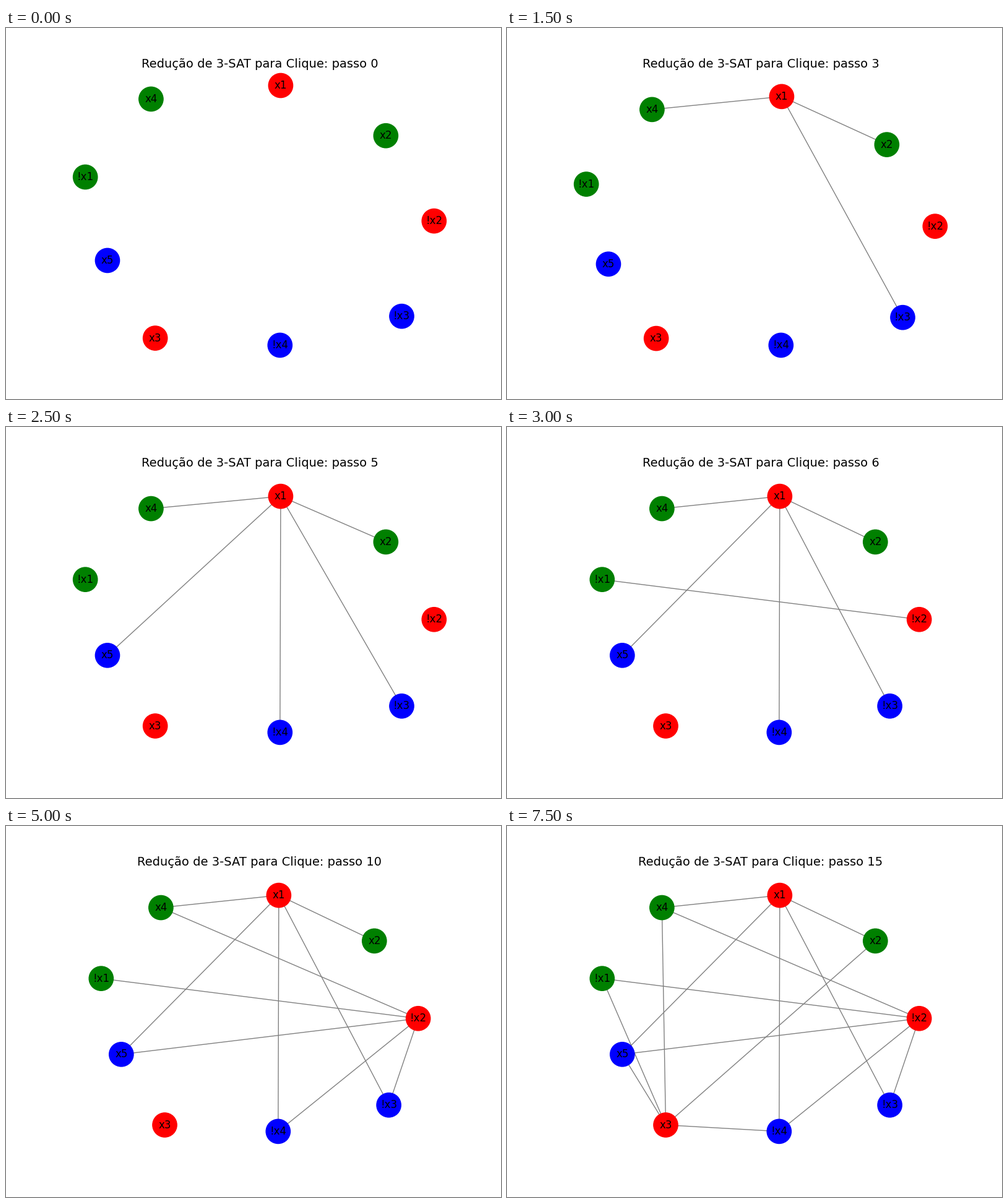
Recreate the animation shown at these times as a matplotlib script. Size 800x600 px, loop 8000 ms.

```python
import numpy as np
import matplotlib.pyplot as plt
from matplotlib.animation import FuncAnimation
from matplotlib.collections import LineCollection

STEP_MS = 500
PAD = 0.05

# One clause per colour; positions are scaled to the unit square.
CLAUSES = [
    ("red", {"x1": (0.5602, 1.0), "!x2": (1.0, 0.4783), "x3": (0.2005, 0.0272)}),
    ("green", {"!x1": (0.0, 0.6476), "x2": (0.8617, 0.8067), "x4": (0.1885, 0.9478)}),
    ("blue", {"!x3": (0.9072, 0.1115), "!x4": (0.5582, 0.0), "x5": (0.0635, 0.3263)}),
]


def opposed(a, b):
    return a == "!" + b or b == "!" + a


pos = {lit: np.array(p) for _, nodes in CLAUSES for lit, p in nodes.items()}
colors = [color for color, nodes in CLAUSES for _ in nodes]
points = np.array(list(pos.values()))

# Link each literal of the first clause to the compatible ones of the others.
edges = [
    (pos[a], pos[b])
    for a in CLAUSES[0][1]
    for _, nodes in CLAUSES[1:]
    for b in nodes
    if not opposed(a, b)
]

fig, ax = plt.subplots(figsize=(8, 6), dpi=100)
fig.subplots_adjust(left=0.125, right=0.9, bottom=0.11, top=0.88)
ax.axis("off")

lines = LineCollection([], colors="gray", linewidths=1, zorder=1)
ax.add_collection(lines, autolim=False)
ax.scatter(points[:, 0], points[:, 1], s=800, c=colors, zorder=2)
for lit, (x, y) in pos.items():
    ax.text(x, y, lit, size=12, ha="center", va="center", zorder=3)
title = ax.set_title("", fontsize=14)


def padded(pts):
    lo, hi = pts.min(axis=0), pts.max(axis=0)
    pad = PAD * (hi - lo)
    return np.array([lo - pad, hi + pad])


def update(step):
    shown = edges[:step]
    lines.set_segments(shown)
    area = points
    if shown:
        area = np.vstack([points, padded(np.vstack(shown))])
    (x0, y0), (x1, y1) = padded(area)
    ax.set_xlim(x0, x1)
    ax.set_ylim(y0, y1)
    title.set_text(f"Redução de 3-SAT para Clique: passo {step}")
    return lines, title


anim = FuncAnimation(fig, update, frames=len(edges) + 1, interval=STEP_MS,
                     repeat=True, repeat_delay=0)
plt.show()
```
